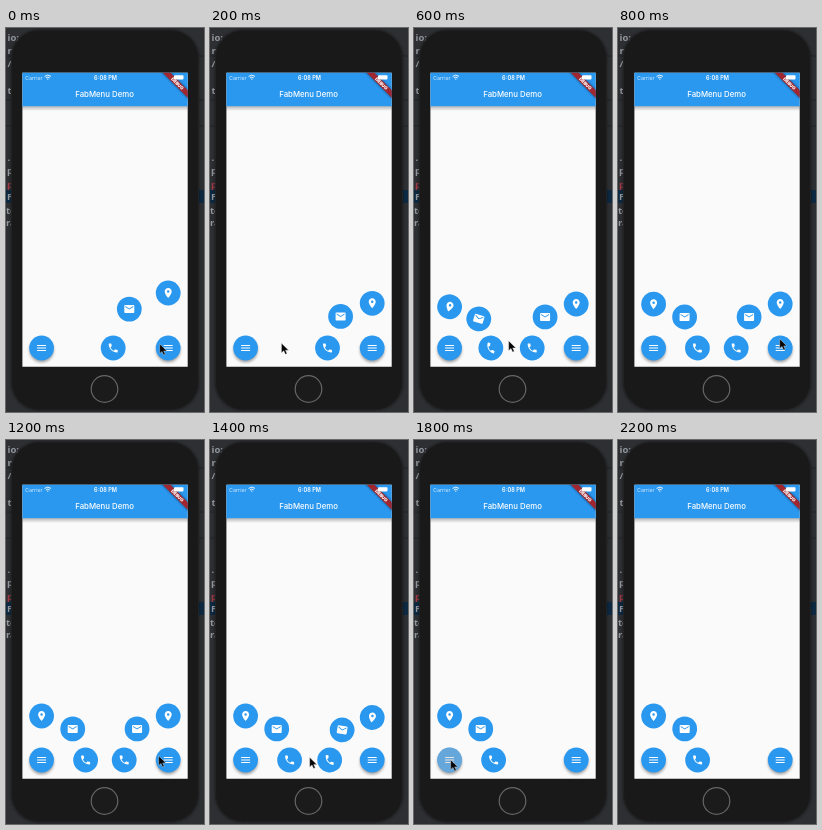
Recreate the animation shown at these times as an HTML page. Size 198 by 384 pixels, loop 2300 ms.

```html
<!DOCTYPE html>
<html lang="en">
<head>
<meta charset="utf-8">
<title>FabMenu Demo</title>
<style>
  html, body { margin: 0; width: 100%; height: 100%; overflow: hidden; background: #2d2f33; }
  svg { display: block; width: 100vw; height: 100vh; }
  text { font-family: Inter, Roboto, sans-serif; fill: #fff; }
  .code text { font: 600 9.5px "Noto Sans", sans-serif; fill: #92979d; }
</style>
</head>
<body>
<svg viewBox="0 0 198 384" xmlns="http://www.w3.org/2000/svg">
  <defs>
    <linearGradient id="barShadow" x1="0" y1="0" x2="0" y2="1">
      <stop offset="0" stop-color="#000" stop-opacity=".28"/>
      <stop offset="1" stop-color="#000" stop-opacity="0"/>
    </linearGradient>
    <filter id="blur" x="-30%" y="-30%" width="160%" height="160%"><feGaussianBlur stdDeviation="1.8"/></filter>
    <clipPath id="screen"><rect x="16.4" y="44.8" width="165.3" height="294"/></clipPath>
    <g id="menu"><path d="M3 18h18v-2H3v2zm0-5h18v-2H3v2zm0-7v2h18V6H3z"/></g>
    <g id="phone"><path d="M6.62 10.79c1.44 2.83 3.76 5.14 6.59 6.59l2.2-2.2c.27-.27.67-.36 1.02-.24 1.12.37 2.33.57 3.57.57.55 0 1 .45 1 1V20c0 .55-.45 1-1 1C10.61 21 3 13.39 3 4c0-.55.45-1 1-1h3.5c.55 0 1 .45 1 1 0 1.25.2 2.45.57 3.57.11.35.03.74-.25 1.02l-2.2 2.2z"/></g>
    <g id="mail"><path d="M20 4H4c-1.1 0-2 .9-2 2v12c0 1.1.9 2 2 2h16c1.1 0 2-.9 2-2V6c0-1.1-.9-2-2-2zm0 4l-8 5-8-5V6l8 5 8-5v2z"/></g>
    <g id="place"><path d="M12 2C8.13 2 5 5.13 5 9c0 5.25 7 13 7 13s7-7.75 7-13c0-3.87-3.13-7-7-7zm0 9.5a2.5 2.5 0 0 1 0-5 2.5 2.5 0 0 1 0 5z"/></g>
  </defs>

  <!-- editor behind the phone -->
  <rect width="198" height="384" fill="#2d2f33"/>
  <rect y="162" width="198" height="13" fill="#0d2942"/>
  <path d="M0 28H198M0 72H198M0 98H198" stroke="#212427"/>
  <g class="code">
    <text x="1.5" y="13">io:</text>
    <text x="1.5" y="26">r</text>
    <text x="1.5" y="39">/*</text>
    <text x="1.5" y="66">t</text>
    <text x="1.5" y="133">.</text>
    <text x="1" y="146">p</text>
    <text x="1" y="160" style="fill:#a33a48">p</text>
    <text x="1" y="172">F</text>
    <text x="0" y="186">te</text>
    <text x="0" y="198">ra</text>
  </g>

  <!-- phone -->
  <rect x="5" y="2" width="188" height="380.5" rx="28" opacity=".45" filter="url(#blur)"/>
  <rect x="5.5" y="2" width="187" height="380" rx="28" fill="#191919" stroke="#222"/>
  <circle cx="98.5" cy="361" r="13.3" fill="#1b1b1b" stroke="#666" stroke-width="1.2"/>
  <g clip-path="url(#screen)">
    <rect x="16" y="44" width="166" height="295" fill="#fafafa"/>
    <rect x="16" y="78" width="166" height="5" fill="url(#barShadow)"/>
    <rect x="16" y="44" width="166" height="34.2" fill="#2b98f0"/>
    <g transform="translate(171.4 55.6) rotate(45)">
      <rect x="-22" y="-2.7" width="44" height="5.4" opacity=".5" filter="url(#blur)"/>
      <rect x="-22" y="-2.7" width="44" height="5.4" fill="#a0262f"/>
      <text y="1.6" font-size="4.5" font-weight="900" text-anchor="middle">DEBUG</text>
    </g>
    <g id="fabs"></g>
  </g>
  <text x="19" y="51.6" font-size="5.4" style="fill:#d3e9fb">Carrier</text>
  <g fill="none" stroke="#fff" stroke-width=".9">
    <path d="M38.6 48.4q3.2-2.6 6.4 0M39.9 49.9q1.9-1.6 3.8 0"/>
  </g>
  <circle cx="41.8" cy="51.1" r=".7" fill="#fff"/>
  <text x="99.5" y="51.6" font-size="5.6" font-weight="600" text-anchor="middle">6:08 PM</text>
  <rect x="168" y="47.2" width="9.5" height="4.2" rx=".8" fill="#fff"/>
  <text x="98.6" y="69.3" font-size="7.8" font-weight="500" text-anchor="middle">FabMenu Demo</text>

  <circle id="ring" r="13.7" fill="none" stroke="#080808" stroke-width="2.1"/>
  <path id="cursor" d="M.7 .9v9.6l2.3-2 1.6 3.5 1.6-.7-1.5-3.4h3.1z" fill="#050505" stroke="#ddd" stroke-width=".4"/>
</svg>
<script>
const LOOP = 2300, STEP = 100, REACH = 44, FAB_Y = 320, SPIN = 270;
const BLUE = '#2b98f0';
const $ = id => document.getElementById(id);
const clamp = v => Math.min(1, Math.max(0, v));
const show = (node, on) => node.setAttribute('visibility', on ? 'visible' : 'hidden');

function add(parent, tag, attrs) {
  const node = document.createElementNS('http://www.w3.org/2000/svg', tag);
  for (const key in attrs) node.setAttribute(key, attrs[key]);
  return parent.appendChild(node);
}

function addButton(parent, icon) {
  const g = add(parent, 'g', {});
  add(g, 'circle', { r: 12.4, fill: BLUE });
  add(g, 'use', { href: '#' + icon, fill: '#fff', transform: 'scale(.5) translate(-12 -12)' });
  return g;
}

// side: +1 fans out to the right, -1 to the left
function createMenu(x, side) {
  const root = add($('fabs'), 'g', { transform: `translate(${x} ${FAB_Y})` });
  const items = ['phone', 'mail', 'place'].map((icon, i) => ({
    node: addButton(root, icon),
    dx: side * Math.cos(i * Math.PI / 4),
    dy: -Math.sin(i * Math.PI / 4)
  }));
  add(root, 'circle', { cy: 2.2, r: 12, fill: '#000', opacity: .38, filter: 'url(#blur)' });
  addButton(root, 'menu');
  const splash = add(root, 'circle', { r: 12.4, fill: '#bcbcbc', opacity: 0 });

  return (open, pressed) => {
    const spin = SPIN * (1 - clamp(open));
    for (const { node, dx, dy } of items) {
      show(node, open > 0);
      const r = REACH * open;
      node.setAttribute('transform', `translate(${dx * r} ${dy * r}) rotate(${spin})`);
    }
    splash.setAttribute('opacity', pressed);
  };
}

const setLeft = createMenu(35.6, 1);
const setRight = createMenu(162.2, -1);

function elasticOut(t) {
  if (t <= 0) return 0;
  if (t >= 1) return 1;
  return 1 + 2 ** (-10 * t) * Math.sin((t - 0.1) * 5 * Math.PI);
}

// time, x, y of the pointer tip
const path = [
  [0, 153, 315], [300, 42, 314], [400, 38, 313], [500, 38, 313],
  [700, 150, 311], [800, 161, 310], [1000, 161, 311], [1200, 152, 315],
  [1300, 152, 315], [1500, 46, 318], [1600, 36, 319], [1900, 36, 319], [2100, 32, 386]
];

function pointerAt(t) {
  const next = path.findIndex(p => p[0] > t);
  if (next < 0) return path[path.length - 1].slice(1);
  const [t0, x0, y0] = path[next - 1], [t1, x1, y1] = path[next];
  const u = (t - t0) / (t1 - t0), k = u * u * (3 - 2 * u);
  return [x0 + (x1 - x0) * k, y0 + (y1 - y0) * k];
}

function draw(t) {
  const closing = clamp((1690 - t) / 300);
  setRight(t < 1400 ? elasticOut((t + 100) / 500) : closing, 0);
  setLeft(elasticOut((t - 400) / 500), 0.4 * clamp(1 - Math.abs(t - 1800) / 200));

  const [x, y] = pointerAt(t);
  $('cursor').setAttribute('transform', `translate(${x} ${y})`);
  show($('cursor'), t < 2100);
  $('ring').setAttribute('transform', `translate(${x + .5} ${y + 1.7})`);
  show($('ring'), t === 400 || t === 1300);
}

const start = performance.now();
function tick() {
  const t = (performance.now() - start) % LOOP;
  draw(Math.floor(t / STEP) * STEP);
  requestAnimationFrame(tick);
}
tick();
</script>
</body>
</html>
```
